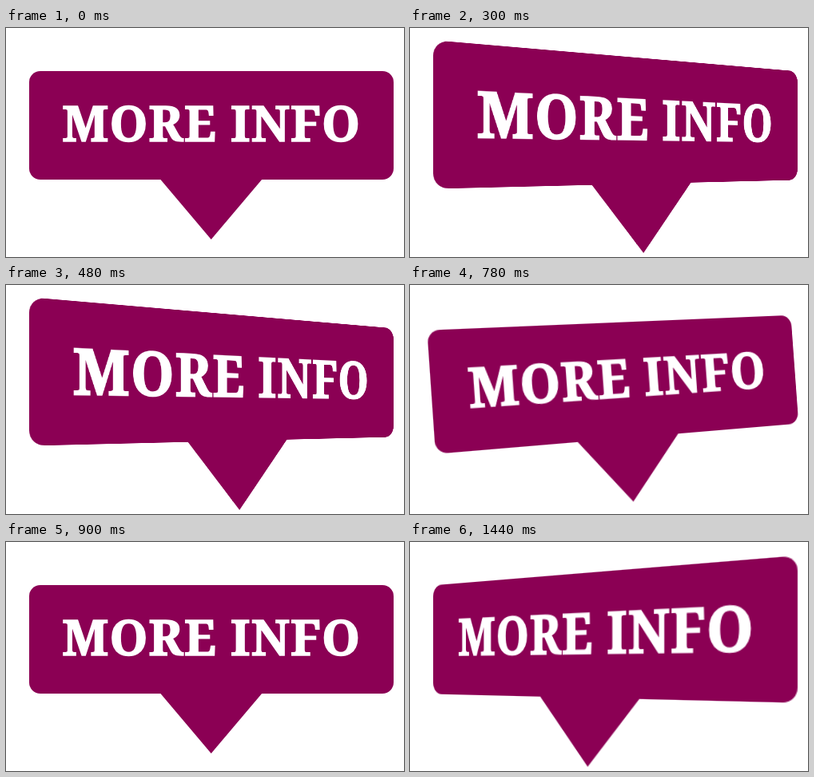
Recreate the animation shown at these times as an HTML page. Size 498 by 287 pixels, loop 1740 ms.

```html
<!DOCTYPE html>
<html lang="en">
<head>
<meta charset="utf-8">
<title>More info</title>
<style>
  html, body { margin: 0; width: 100%; height: 100%; overflow: hidden; background: #fff; }
  svg { display: block; transform-origin: 0 0; overflow: visible; }
  text {
    font: 600 61px "Noto Serif", serif; letter-spacing: 1.2px;
    fill: #fff; stroke: #fff; stroke-width: 1.5;
    text-anchor: middle;
  }
</style>
</head>
<body>
<svg id="sign" width="498" height="287" viewBox="0 0 498 287">
  <g fill="#8b0054">
    <rect x="29" y="54" width="456" height="136" rx="14"/>
    <path d="M193 189.5H320.5L256.7 265Z"/>
  </g>
  <text x="257.2" y="142.4">MORE INFO</text>
</svg>
<script>
const sign = document.getElementById("sign");
const LEFT = 29, RIGHT = 485, TOP = 54, BOTTOM = 190;
const LOOP = 1740;

// Panel corners: top left, top right, bottom right, bottom left.
// The leaning poses take the height of their top left corner.
const flat = () => [[LEFT, TOP], [RIGHT, TOP], [RIGHT, BOTTOM], [LEFT, BOTTOM]];
const swing = top => [[LEFT, top], [RIGHT, TOP + 0.3], [RIGHT, BOTTOM + 0.5], [LEFT, BOTTOM + 11.6]];
const tilt = top => [[21.3, top], [476.4, 37.8], [486.3, 173.6], [32, 211.8]];

const mirror = ([topLeft, topRight, bottomRight, bottomLeft]) =>
  [topRight, topLeft, bottomLeft, bottomRight].map(([x, y]) => [LEFT + RIGHT - x, y]);

// Perspective transform that carries the flat panel onto four corners.
function project([[x0, y0], [x1, y1], [x2, y2], [x3, y3]]) {
  const dx1 = x1 - x2, dx2 = x3 - x2, sx = x0 - x1 + x2 - x3;
  const dy1 = y1 - y2, dy2 = y3 - y2, sy = y0 - y1 + y2 - y3;
  const det = dx1 * dy2 - dx2 * dy1;
  const g = (sx * dy2 - dx2 * sy) / det;
  const h = (dx1 * sy - sx * dy1) / det;
  const matrix = [
    x1 - x0 + g * x1, y1 - y0 + g * y1, 0, g,
    x3 - x0 + h * x3, y3 - y0 + h * y3, 0, h,
    0, 0, 1, 0,
    x0, y0, 0, 1
  ].map(n => n.toFixed(9));
  const toUnit = `scale(${1 / (RIGHT - LEFT)}, ${1 / (BOTTOM - TOP)}) translate(${-LEFT}px, ${-TOP}px)`;
  return `matrix3d(${matrix}) ${toUnit}`;
}

// The sign sways to one side, rests, then sways back mirrored.
const poses = [
  { at: 0, corners: flat() },
  { at: 300, corners: swing(15.2) },
  { at: 600, corners: tilt(56.8) },
  { at: 900, corners: flat() },
  { at: 1170, corners: mirror(tilt(51.4)) },
  { at: 1440, corners: mirror(swing(17)) }
];
for (const pose of poses) pose.transform = project(pose.corners);

const start = performance.now();
function draw(now) {
  const time = Math.max(0, now - start) % LOOP;
  sign.style.transform = poses.findLast(pose => pose.at <= time).transform;
  requestAnimationFrame(draw);
}
draw(start);
</script>
</body>
</html>
```
